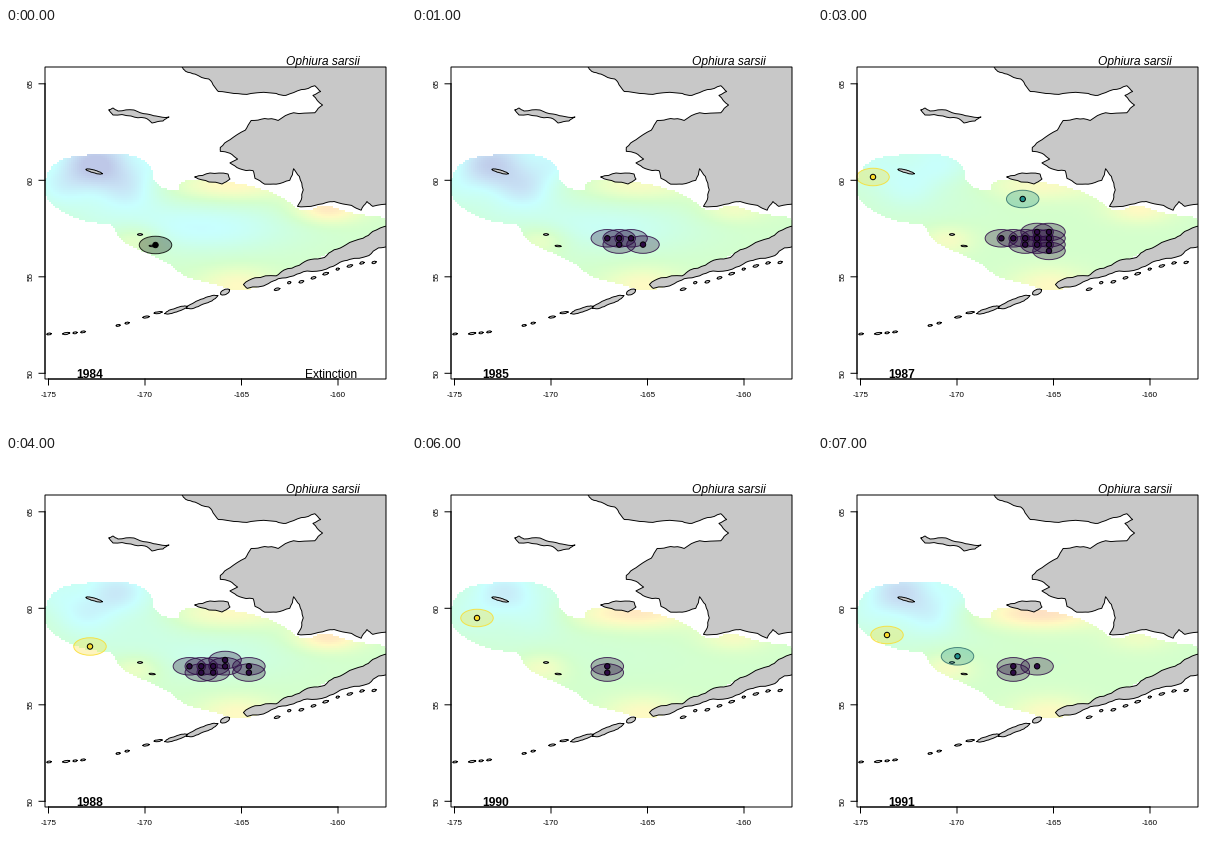
A matplotlib script that plays this animation: 400 px wide and 400 px high, repeating every 8 s.

```python
import numpy as np
import matplotlib.pyplot as plt
from matplotlib.animation import ArtistAnimation
from matplotlib.colors import to_rgba
from matplotlib.patches import Circle, Ellipse, Polygon, Rectangle
from matplotlib.path import Path

plt.rcParams["font.family"] = "Liberation Sans"
PX = 0.72  # points per pixel at 100 dpi
LEFT, TOP, RIGHT, BOTTOM = 39, 39, 380, 351
YEARS = range(1984, 1992)
LAND = "#c8c8c8"
rng = np.random.default_rng(4)

fig = plt.figure(figsize=(4, 4), dpi=100, facecolor="white")
ax = fig.add_axes([0, 0, 1, 1])
ax.axis("off")
frame = Rectangle((LEFT, TOP), RIGHT - LEFT, BOTTOM - TOP, fc="none",
                  ec="black", lw=PX, snap=False, zorder=8)
ax.add_patch(frame)


def label(x, y, text, size=12, **kw):
    kw = {"ha": "left", "va": "baseline", "zorder": 9} | kw
    return ax.text(x, y, text, fontsize=size * PX, **kw)


def stroke(xs, ys):
    ax.plot(xs, ys, color="black", lw=PX, snap=False, zorder=8)


def project(points):
    """Longitude and latitude to pixels."""
    lon, lat = np.array(points, float).T
    return np.c_[42.5 + 19.3 * (lon + 175), 345.3 - 19.3 * (lat - 50)]


def rough(pts, amount=0.07, levels=2):
    """Midpoint displacement, in proportion to each segment's length."""
    for _ in range(levels):
        step = np.diff(pts, axis=0)
        normal = step[:, ::-1] * (-1, 1)
        mids = pts[:-1] + step / 2 + normal * rng.uniform(-amount, amount, (len(step), 1))
        pts = np.insert(pts, range(1, len(pts)), mids, axis=0)
    return pts


def land(pts, corner=None):
    coast = rough(np.array(pts, float))
    shape = coast if corner is None else np.vstack([coast, corner])
    fill = ax.add_patch(Polygon(shape, fc=LAND, ec="none", zorder=3))
    line, = ax.plot(*coast.T, color="black", lw=0.95 * PX, zorder=4)
    for artist in (fill, line):
        artist.set_clip_path(frame)


def island(x, y, w, h, tilt=0, sides=10):
    a = np.linspace(0, 2 * np.pi, sides + 1)
    t = np.radians(tilt)
    u, v = w / 2 * np.cos(a), h / 2 * np.sin(a)
    land(np.c_[x + u * np.cos(t) - v * np.sin(t), y + u * np.sin(t) + v * np.cos(t)])


# Mainland, from the Bering Strait round to Bristol Bay
north = [(-168.1, 65.9), (-167.9, 65.65), (-167.4, 65.5), (-166.7, 65.25),
         (-166.4, 64.85), (-166.2, 64.6), (-165.4, 64.5), (-164.5, 64.5),
         (-163.2, 64.5), (-162.7, 64.4), (-161.9, 64.7), (-161.2, 64.9),
         (-160.9, 64.6), (-161.3, 64.4), (-160.8, 63.9), (-161.2, 63.5),
         (-162.3, 63.5), (-163.1, 63.1), (-163.8, 63.2), (-164.5, 63.1),
         (-164.8, 62.6), (-165.6, 62.1), (-166.1, 61.7), (-166.1, 61.5)]
south = [(-165.6, 61.4), (-165.2, 61.1), (-165.6, 60.9), (-165.1, 60.6),
         (-164.4, 60.5), (-164.3, 60.1), (-163.8, 59.8), (-163.2, 59.8),
         (-162.5, 60.0), (-162.3, 60.6), (-162, 60.2), (-161.8, 59.5),
         (-161.9, 59.0), (-162.1, 58.65), (-161.4, 58.65), (-160.6, 58.85),
         (-160.2, 58.9), (-159.3, 58.7), (-158.8, 58.45), (-158.5, 58.9),
         (-158.2, 58.65), (-157.3, 58.8)]
land(project(north + south), corner=[(RIGHT + 5, TOP)])

peninsula = [(-157.4, 57.65), (-158.2, 57.35), (-158.7, 57.0), (-159.6, 56.65),
             (-160.2, 56.4), (-160.7, 56.0), (-161.4, 55.9), (-162, 55.6),
             (-162.8, 55.35), (-163.2, 55.05), (-164.3, 54.95), (-164.9, 54.6),
             (-164.7, 54.4), (-163.6, 54.65), (-163.1, 54.9), (-162.3, 55.05),
             (-161.6, 55.3), (-160.6, 55.4), (-159.9, 55.75), (-159.4, 55.9),
             (-158.4, 56.1), (-157.9, 56.5), (-157.4, 56.6)]
land(project(peninsula))

# Islands
land([(103, 82), (107, 80), (112, 83), (128, 82), (141, 86), (150, 88), (163, 89),
      (157, 93), (146, 95), (139, 90), (125, 88), (107, 87), (103, 82)])
land([(189, 149), (204, 145), (222, 146), (224, 151), (216, 156), (203, 154),
      (189, 149)])
island(88, 143.5, 17, 3, 15)
island(134, 206.5, 5, 1.8)
island(146, 218, 6, 1.5, 5)
island(196, 274, 34, 6, -22)
island(219, 264, 10, 5, -25)
island(170, 282, 24, 4, -18)
for x in (43, 60, 69, 77, 112, 121, 140, 152):
    island(x, 306 - 0.0018 * (x - 43) ** 2, rng.uniform(4, 9), 2, -8, 6)
for x in np.linspace(271, 368, 9):
    island(x, 260 - 0.28 * (x - 271) + rng.uniform(-2, 2), rng.uniform(3, 6), 2.4, -15, 6)

# Axes and title
stroke([42.5, 332], [BOTTOM, BOTTOM])
stroke([LEFT, LEFT], [55.8, 345.3])
for k in range(4):
    x, y = 42.5 + 96.5 * k, 345.3 - 96.5 * k
    stroke([x, x], [BOTTOM, BOTTOM + 6])
    stroke([LEFT - 6, LEFT], [y, y])
    label(x, 369, f"{-175 + 5 * k}", 8, ha="center")
    label(25.5, y, f"{50 + 5 * k}", 8, ha="center", va="center", rotation=90)
label(280, 37, "Ophiura sarsii", style="italic")


def smooth(pts, rounds=2):
    """Corner cutting on a closed outline."""
    for _ in range(rounds):
        after = np.roll(pts, -1, axis=0)
        pts = np.stack([0.75 * pts + 0.25 * after, 0.25 * pts + 0.75 * after], 1)
        pts = pts.reshape(-1, 2)
    return pts


# Survey area
outline = np.array([(38, 168), (39, 148), (52, 131), (85, 126), (128, 126), (147, 139),
                    (147, 155), (171, 166), (176, 151), (205, 152), (240, 156),
                    (275, 167), (292, 182), (305, 183), (318, 175), (345, 186),
                    (384, 189), (384, 205), (330, 222), (285, 243), (239, 266),
                    (205, 255), (178, 249), (165, 236), (140, 225), (112, 212),
                    (108, 195), (80, 195), (52, 182)], float)
area = Path(smooth(outline))
CELL = 2
gx, gy = np.meshgrid(np.arange(LEFT, RIGHT, CELL) + CELL / 2,
                     np.arange(120, 270, CELL) + CELL / 2)
inside = area.contains_points(np.c_[gx.ravel(), gy.ravel()]).reshape(gx.shape)

# Cold to warm
PALETTE = np.array([(190, 200, 232), (200, 226, 245), (200, 255, 255),
                    (205, 255, 228), (212, 255, 205), (234, 255, 198),
                    (255, 250, 195), (255, 230, 193), (251, 214, 200)]) / 255
# Strength of northwest cold, central cold, northern warmth, bay warmth
CLIMATE = {1984: (3.8, 2, 2.3, 3), 1986: (3.2, 1.2, 1.2, 0), 1987: (2, 0, 1.8, 2),
           1988: (2.6, 1.2, 2, 3), 1989: (1.6, 0.6, 2.5, 2), 1991: (3, 0, 3.4, 1.2)}


def bump(x, y, sx, sy):
    return np.exp(-((gx - x) / sx) ** 2 / 2 - ((gy - y) / sy) ** 2 / 2)


def field(year):
    cold, pool, warm, bay = (np.interp(year, list(CLIMATE), column)
                             for column in zip(*CLIMATE.values()))
    ripple = 1 + 0.2 * np.sin(gx / 14 + year) * np.sin(gy / 12)
    heat = (4 + 2 * bump(232, 258, 28, 13) + 1.6 * bump(130, 212, 18, 10)
            - cold * ripple * bump(95, 142, 48, 28)
            - pool * bump(200, 200, 65, 18)
            + warm * bump(220, 157, 45, 11) + bay * bump(322, 181, 24, 10))
    steps = np.arange(len(PALETTE))
    rgb = [np.interp(heat, steps, PALETTE[:, c]) for c in range(3)]
    extent = (LEFT, LEFT + CELL * gx.shape[1], 120 + CELL * gx.shape[0], 120)
    image = ax.imshow(np.dstack(rgb + [inside.astype(float)]), extent=extent,
                      interpolation="nearest", aspect="auto", zorder=1)
    image.set_clip_path(frame)
    return image


# Central population: column and row on the survey grid
CORE = {1985: "11 21 31 22 42", 1986: "01 11 21 30 31 41 22 32 42 52",
        1987: "01 11 21 30 40 31 41 22 32 42 43", 1988: "01 11 21 30 31 51 12 22 52",
        1989: "11 12", 1990: "11 12", 1991: "11 12 31"}
BLACK, PURPLE, TEAL, YELLOW = "#000000", "#2d0a45", "#21908c", "#fbdd2c"
OUTLIERS = {1984: [(149.5, 217, BLACK)],
            1986: [(229.7, 171.3, YELLOW)],
            1987: [(55, 149, YELLOW), (204.7, 171, TEAL)],
            1988: [(84, 190.5, YELLOW)],
            1989: [(61, 146, YELLOW)],
            1990: [(65, 162, YELLOW)],
            1991: [(69, 179, YELLOW), (139.5, 200.3, TEAL)]}
EVENTS = {1984: (299, "Extinction"), 1986: (286.5, "Colonization")}


def spot(x, y, color):
    edge = "#2f6f6c" if color == TEAL else color
    halo = Ellipse((x, y), 32.5, 17.5, fc=to_rgba(color, 0.3), ec=to_rgba(edge, 0.85),
                   lw=0.95 * PX, zorder=5)
    dot = Circle((x, y), 2.7, fc=color, ec="black", lw=PX, zorder=6)
    return [ax.add_patch(halo), ax.add_patch(dot)]


def scene(year):
    parts = [field(year), label(70.5, 350, str(year), weight="bold")]
    for col, row in CORE.get(year, "").split():
        parts += spot(183.4 + 11.9 * int(col), 204 + 6.3 * int(row), PURPLE)
    for outlier in OUTLIERS.get(year, []):
        parts += spot(*outlier)
    if year in EVENTS:
        x, text = EVENTS[year]
        parts.append(label(x, 350, text))
    return parts


scenes = [scene(year) for year in YEARS]
ax.set(xlim=(0, 400), ylim=(400, 0))
anim = ArtistAnimation(fig, scenes, interval=1000, repeat=True, repeat_delay=0)
plt.show()
```
